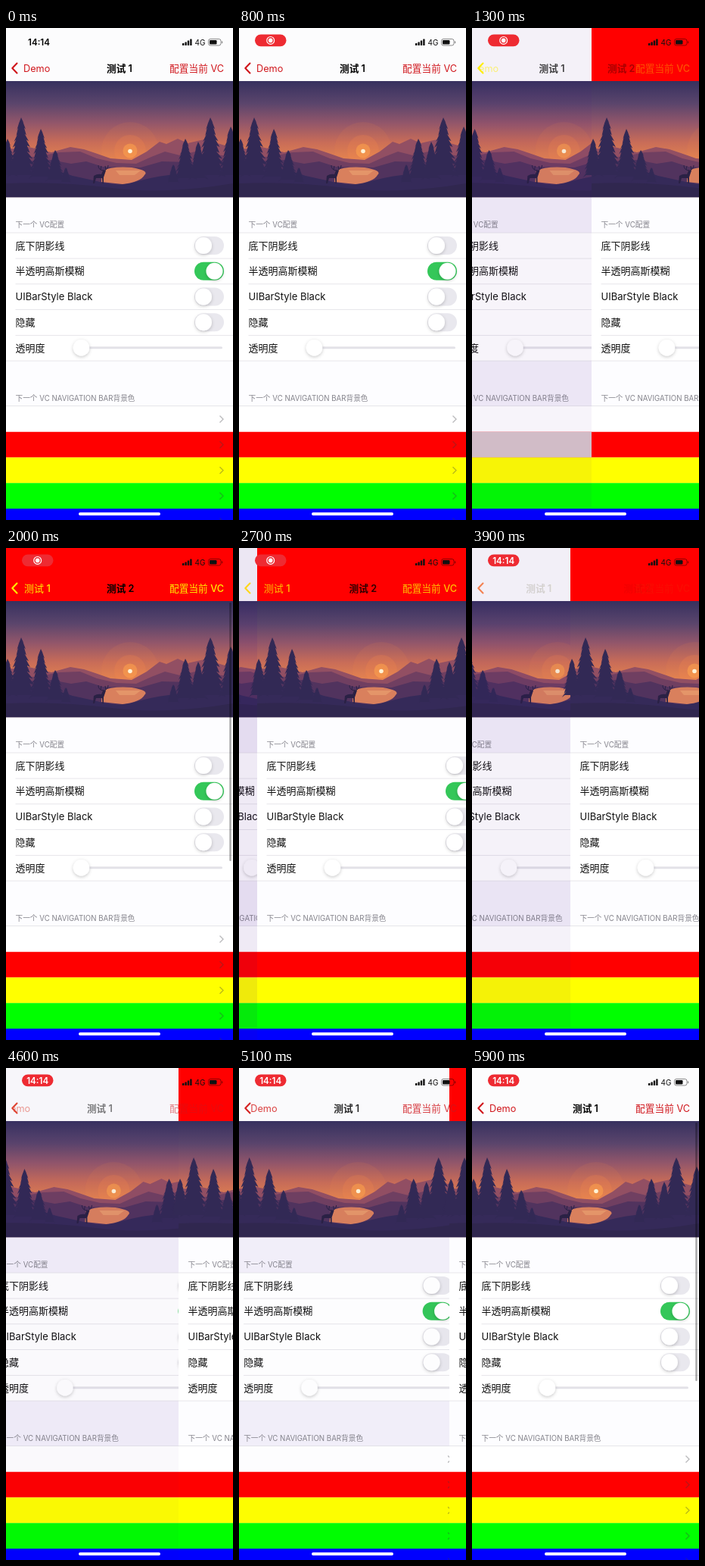
An HTML page that plays this animation: 300 px wide and 649 px high, repeating every 6000 ms.

```html
<!DOCTYPE html>
<html lang="zh-CN">
<head>
<meta charset="utf-8">
<style>
  html, body { margin: 0; width: 100%; height: 100%; overflow: hidden; background: #fff; }
  svg { display: block; width: 300px; height: 649px; font: 13px Inter, "Noto Sans CJK SC", "Noto Sans CJK", sans-serif; }
  .bold { font-weight: 600; }
  .item { font-size: 12.7px; }
  .head { font-size: 9.7px; fill: #85848c; }
  .clock { font-size: 11.6px; font-weight: 600; }
</style>
</head>
<body>
<svg id="stage" viewBox="0 0 300 649"></svg>
<script>
const LOOP = 6000;
const PUSH = 1175, PUSHED = 1675, SWIPE = 2500, BACK = 5300;
const RED = [208, 22, 28], ORANGE = [253, 155, 95], YELLOW = [255, 238, 0];
const DRAG = [[SWIPE, 0], [3200, 85], [3900, 130], [4600, 228], [5000, 268], [BACK, 300]];

const rect = (x, y, w, h, fill, more = '') =>
  `<rect x="${x}" y="${y}" width="${w}" height="${h}" fill="${fill}" ${more}/>`;
const circle = (x, y, r, fill, more = '') => `<circle cx="${x}" cy="${y}" r="${r}" fill="${fill}" ${more}/>`;
const path = (d, fill, more = '') => `<path d="${d}" fill="${fill}" ${more}/>`;
const text = (x, y, str, more = '') => `<text x="${x}" y="${y}" ${more}>${str}</text>`;

// Bushy fir: tiers whose tips droop below the notches.
function tree(x, top, base, width) {
  const tiers = 10, left = [], right = [];
  for (let i = 1; i <= tiers; i++) {
    const y = top + (base - top) * i / tiers;
    const w = width * (i / tiers) ** 0.75 * (i % 3 ? 1 : 0.85);
    right.push(`${x + w} ${y} ${x + w * 0.66} ${y - 2}`);
    left.unshift(`${x - w * 0.66} ${y - 2} ${x - w * 0.95} ${y + 1}`);
  }
  return `M${x} ${top}L${right.join(' ')} ${left.join(' ')}Z`;
}

function scene() {
  const trees = [[20, 118, 196, 20], [46, 133, 198, 17], [2, 146, 196, 14], [65, 161, 202, 14], [79, 184, 205, 8],
    [270, 118, 196, 21], [237, 146, 200, 16], [297, 130, 196, 18], [254, 150, 200, 14], [221, 180, 205, 9]];
  return rect(0, 70, 300, 153.5, 'url(#sky)') +
    circle(164, 162, 38, '#f58b48', 'opacity=".1"') +
    circle(164, 162, 21, '#f58b48', 'opacity=".22"') +
    circle(164, 162, 9.5, '#fba04c', 'opacity=".6"') +
    circle(164, 162.5, 2.8, '#fff3d6') +
    path('M0 160L30 157 60 164 85 157 103 160 118 165 138 172 166 174 186 163 203 150 212 153 227 146 240 152 262 147 300 158V223H0Z', '#924f63') +
    path('M0 169L40 170 70 164 98 163 120 172 146 178 172 179 192 170 210 163 230 168 250 163 300 170V223H0Z', '#703f61') +
    path('M0 177L60 174 86 179 106 176 128 183 178 184 206 176 240 177 300 175V223H0Z', '#51335e') +
    path('M127 189Q139 182 166 184Q190 188 183 194Q178 203 154 206L126 203Z', '#d9805d') +
    path('M145 188H178L170 194H150Z', '#eda472', 'opacity=".6"') +
    path('M0 183Q50 181 88 195L120 202Q145 209 164 205Q190 197 215 194L300 183V223.5H0Z', '#352a59') +
    path('M0 205Q70 202 140 211T300 205V223.5H0Z', '#30274f') +
    path(trees.map(t => tree(...t)).join(''), '#322955') +
    path('M115 205L116 195Q121 192 126 193L128 187 132 188 131 191 129 197 129 205H127.500L127 198H119L117 205Z', '#2a2145') +
    path('M128 188Q122 187 122 181M125 187L126 182M130 188Q135 186 135 181M132 187L131 182', 'none', 'stroke="#2a2145"');
}

function toggle(y, on) {
  return rect(249, y - 12, 39, 24, on ? '#34c759' : '#e9e8ee', 'rx="12"') +
    circle(on ? 275.5 : 261, y, 11, '#fff', 'filter="url(#soft)"');
}

function page(id, bar) {
  const labels = ['底下阴影线', '半透明高斯模糊', 'UIBarStyle Black', '隐藏', '透明度'];
  const colors = ['#fff', '#f00', '#ff0', '#0f0', '#00f'];
  const line = (x, y) => rect(x, y, 300, 0.7, '#dcdbe1');
  const rowY = i => 287 + i * 33.75;
  return `<g id="${id}">` + rect(0, 0, 300, 649, '#fff') + rect(0, 0, 300, 70, bar) + scene() +
    rect(0, 223.5, 300, 46.5, '#fdfdff', 'class="band"') + rect(0, 439, 300, 59.5, '#fdfdff', 'class="band"') +
    text(12.5, 262.5, '下一个 VC配置', 'class="head"') +
    text(12.5, 491.5, '下一个 VC NAVIGATION BAR背景色', 'class="head"') +
    labels.map((s, i) => text(12.5, rowY(i) + 4.7, s, 'fill="#111"') +
      (i < 4 ? toggle(rowY(i), i === 1) + line(12.5, rowY(i) + 16.7) : '')).join('') +
    line(0, 269.7) + line(0, 438.7) + line(0, 498.3) +
    rect(90, 420.3, 196, 3, '#e3e2e8', 'rx="1.5"') + circle(99.5, 421.8, 10.7, '#fff', 'filter="url(#soft)"') +
    colors.map((c, i) => {
      const y = 499 + i * 33.75;
      return rect(0, y, 300, 33.9, c) +
        (i === 1 ? rect(0, y, 300, 33.9, '#d5d2d9', 'class="pressed" opacity="0"') : '') +
        path(`M282.500 ${y + 12.5}l4.500 4.500-4.500 4.500`, 'none', 'stroke="#3c3c43" stroke-opacity=".35" stroke-width="1.4"');
    }).join('') +
    rect(0, 0, 300, 649, '#408', 'class="dim" opacity="0"') + '</g>';
}

const right = 'class="item" x="288" text-anchor="end"';
const bars = [3, 4.5, 6.5, 8.5].map((h, i) => rect(233 + i * 3.4, 23 - h, 2.4, h, '#111', 'rx=".6"')).join('');

document.getElementById('stage').innerHTML = `<defs>
  <linearGradient id="sky" x1="0" y1="70" x2="0" y2="176" gradientUnits="userSpaceOnUse">
    <stop stop-color="#37315f"/><stop offset=".28" stop-color="#5b456c"/><stop offset=".52" stop-color="#92566a"/>
    <stop offset=".76" stop-color="#c86c58"/><stop offset="1" stop-color="#e5854f"/>
  </linearGradient>
  <filter id="soft" x="-60%" y="-60%" width="220%" height="220%">
    <feDropShadow dx="0" dy="1.5" stdDeviation="2.1" flood-opacity=".22"/></filter>
  <clipPath id="backClip">${rect(10, 35, 290, 35, '#000')}</clipPath>
</defs>` +
  page('first', '#fcfcfd') + page('second', '#f00') +
  path('M14.500 46.500L8.300 53l6.200 6.500', 'none', 'id="chevron" stroke-width="2.1" stroke-linecap="round" stroke-linejoin="round"') +
  `<g clip-path="url(#backClip)">${text(23, 57.7, 'Demo', 'id="demo" class="item"')}</g>` +
  text(133, 57.7, '测试 1', 'id="title1" class="item bold"') +
  text(133, 57.7, '测试 1', 'id="label1" fill="#ffee00" font-weight="500"') +
  text(133, 57.7, '测试 2', 'id="title2" class="item bold"') +
  `<text id="right1" ${right} y="57.7" fill="rgb(${RED})">配置当前 VC</text>` +
  `<text id="right2" ${right} y="57.7" fill="#ffee00" font-weight="500">配置当前 VC</text>` +
  bars + text(249.5, 23, '4G', 'font-size="10" fill="#111"') +
  rect(267.5, 14.5, 16.5, 8.5, 'none', 'rx="2.6" stroke="#000" stroke-opacity=".45"') +
  rect(269, 16, 9.5, 5.5, '#111', 'rx="1.3"') + rect(285, 17.3, 1.2, 3, '#000', 'rx=".6" opacity=".45"') +
  text(43.5, 22.7, '14:14', 'id="plainClock" class="clock" text-anchor="middle"') +
  `<g id="pill">${rect(21, 8.5, 41.5, 15.7, '#ee2b32', 'rx="7.8"')}
    <g id="record">${circle(41.7, 16.4, 4.9, 'none', 'stroke="#fff" stroke-width="1.2"')}${circle(41.7, 16.4, 2.8, '#fff')}</g>
    ${text(41.7, 20.6, '14:14', 'id="pillClock" class="clock" fill="#fff" text-anchor="middle"')}</g>` +
  rect(295.3, 72, 2.4, 341, '#000', 'id="scroller" rx="1.2"') +
  rect(96, 639, 108, 4, '#fff', 'rx="2"');

const $ = id => document.getElementById(id);
const clamp = v => Math.min(1, Math.max(0, v));
const ramp = (t, a, b) => clamp((t - a) / (b - a));
const mix = (a, b, k) => a.map((v, i) => Math.round(v + (b[i] - v) * k));
const fade = (id, v) => $(id).setAttribute('opacity', clamp(v));
const shift = (id, x) => $(id).setAttribute('transform', `translate(${x} 0)`);
const pressed = document.querySelector('#first .pressed');
const dim = document.querySelector('#first .dim');
const bands = document.querySelectorAll('#first .band');

// Share of the first page uncovered: 1 = first page, 0 = second page.
function uncovered(t) {
  if (t < PUSHED) return (1 - ramp(t, PUSH, PUSHED)) ** 2.2;
  if (t >= BACK) return 1;
  const i = DRAG.findIndex(p => p[0] > t);
  if (i < 1) return 0;
  const [t0, x0] = DRAG[i - 1], [t1, x1] = DRAG[i];
  return (x0 + (x1 - x0) * (t - t0) / (t1 - t0)) / 300;
}

function draw(t) {
  const f = uncovered(t);
  const pushing = t >= PUSH && t < PUSHED;
  const enter = pushing ? f ** 1.9 : f;
  const leave = pushing ? f ** 0.82 : f;

  shift('first', -90 * (1 - f));
  shift('second', Math.floor(300 * f));
  $('second').style.display = f < 1 ? '' : 'none';
  dim.setAttribute('opacity', 0.09 * (1 - f));
  bands.forEach(b => b.setAttribute('fill', f < 1 ? '#f3f0fa' : '#fdfdff'));
  pressed.setAttribute('opacity', t < 1050 ? 0 : 1 - ramp(t, 1280, 1600));

  const tint = pushing ? YELLOW : f < 0.3 ? mix(YELLOW, ORANGE, f / 0.3) : mix(ORANGE, RED, (f - 0.3) / 0.7);
  $('chevron').setAttribute('stroke', `rgb(${tint})`);
  $('demo').setAttribute('fill', `rgb(${tint})`);
  shift('demo', -109 * (1 - f) * (pushing ? 0.45 : 1));
  fade('demo', pushing ? f : 2 * f - 1);
  shift('title1', -109 * (1 - leave));
  shift('label1', -109 * (1 - leave));
  fade('title1', pushing ? 1.4 * f : f ** 2.5);
  fade('label1', 1 - 2.2 * f);
  shift('title2', 155 * enter);
  fade('title2', 1 - 2.2 * enter);
  fade('right2', 1 - 2.2 * enter);
  fade('right1', enter ** 2.3);

  const recording = t >= 400, clock = ramp(t, 3000, 3400);
  fade('plainClock', recording ? 0 : 1);
  fade('pill', recording ? 1 : 0);
  fade('record', 1 - clock);
  fade('pillClock', clock);
  const flash = (t >= PUSHED && t < SWIPE) ? 1 - ramp(t, 2250, SWIPE) : t >= BACK ? 1 : 0;
  fade('scroller', 0.35 * flash);
}

const start = performance.now();
function tick() {
  draw((performance.now() - start) % LOOP);
  requestAnimationFrame(tick);
}
draw(0);
requestAnimationFrame(tick);
</script>
</body>
</html>
```
